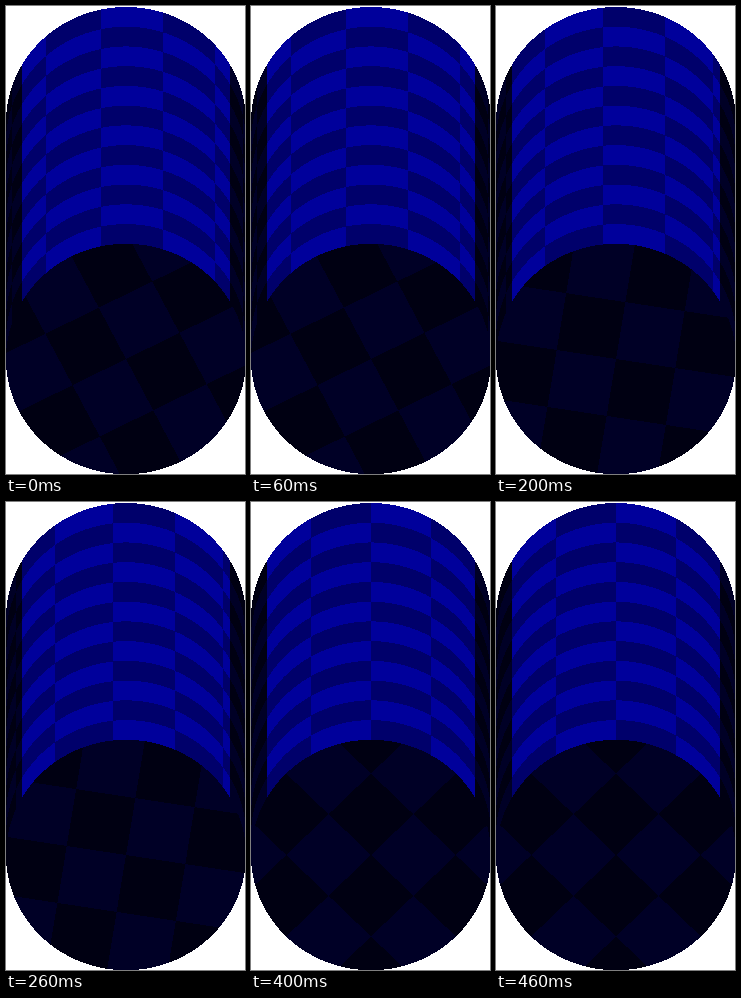
Write an HTML page with a canvas that moves like this. It is 239x468 px and loops after 500 ms.

```html
<!DOCTYPE html>
<html>
<head>
<meta charset="utf-8">
<style>
  html, body { margin: 0; overflow: hidden; background: #fff; }
  canvas { display: block; }
</style>
</head>
<body>
<canvas id="stage" width="239" height="468"></canvas>
<script>
const W = 239, H = 468, STEPS = 5, STEP_MS = 100;
const CX = 120, RX = 120, RY = 115.2;       // cylinder seen at a slight tilt
const BACK = 116.2, FRONT = 353;            // centre heights of both ends
const RINGS = 12, SECTOR = Math.PI / 6, LIT = Math.PI / 3;
const LIT_BLUES = [107, 155], DIM_BLUES = [18, 38];

const ctx = document.getElementById('stage').getContext('2d');
const image = ctx.createImageData(W, H);
const odd = n => n & 1;

// Blue level of the checkered cylinder at a point, or -1 outside it
function shade(x, y, turn) {
  const u = (x - CX) / RX, v = (y - FRONT) / RY;
  if (u * u + v * v < 1) {
    const c = Math.cos(turn), s = Math.sin(turn);
    const cell = Math.floor(2 * (u * c + v * s)) + Math.floor(2 * (v * c - u * s));
    return DIM_BLUES[odd(cell)];
  }
  const angle = Math.asin(u);
  const depth = (y + RY * Math.cos(angle) - BACK) / (FRONT - BACK);
  if (!(depth >= 0 && depth < 1)) return -1;
  const sector = Math.floor((angle - turn) / SECTOR + 0.5);
  const cell = sector + Math.floor(depth * RINGS);
  return (Math.abs(angle) < LIT ? LIT_BLUES : DIM_BLUES)[odd(cell)];
}

function draw(step) {
  const turn = (-27 - 360 * step / STEPS) * Math.PI / 180;
  for (let y = 0, i = 0; y < H; y++) {
    for (let x = 0; x < W; x++, i += 4) {
      const blue = shade(x + 0.5, y + 0.5, turn);
      const inside = blue >= 0;
      image.data[i] = image.data[i + 1] = inside ? 0 : 255;
      image.data[i + 2] = inside ? blue : 255;
      image.data[i + 3] = 255;
    }
  }
  ctx.putImageData(image, 0, 0);
}

let shown = -1;
function tick() {
  const step = Math.floor(performance.now() / STEP_MS) % STEPS;
  if (step !== shown) draw(shown = step);
  requestAnimationFrame(tick);
}
tick();
</script>
</body>
</html>
```
